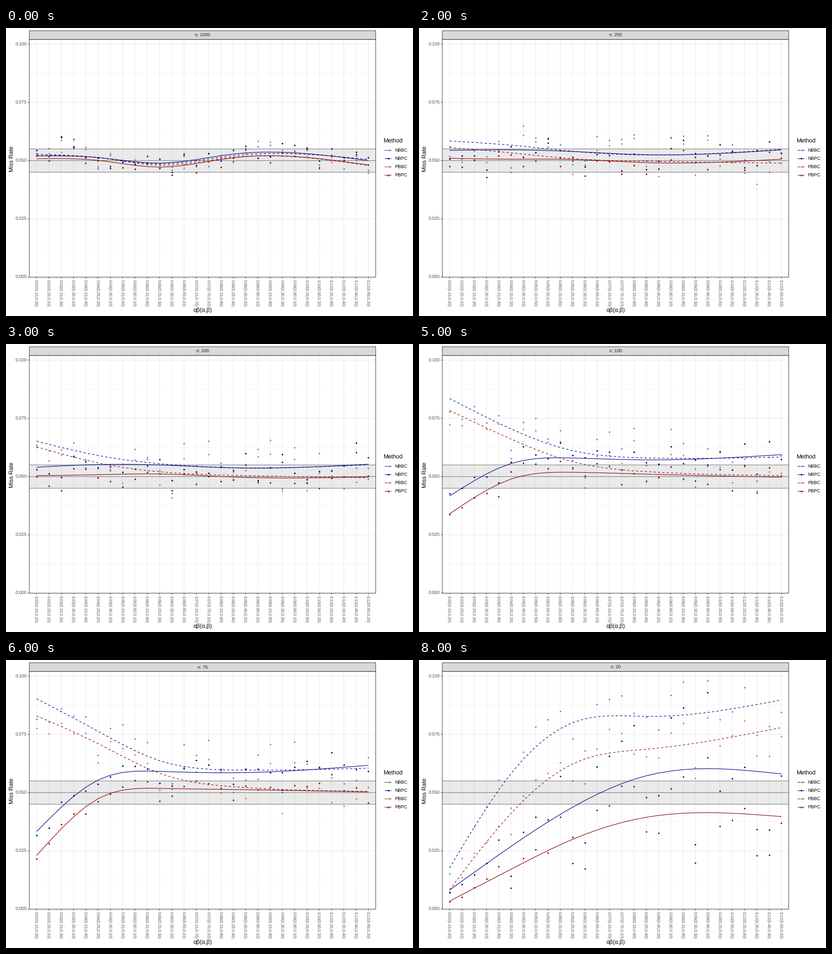
Recreate the animation shown at these times as a matplotlib script. Size 890 by 629 pixels, loop 9000 ms.

```python
import numpy as np
import matplotlib.pyplot as plt
from matplotlib.animation import FuncAnimation
from matplotlib.patches import Rectangle

W, H, DPI = 890, 629, 100
LEFT, RIGHT, TOP, BOTTOM = 51, 808.5, 25, 544.2
NAVY, MAROON = "#00008B", "#8B0000"
plt.rcParams.update({"font.family": "Liberation Sans", "path.snap": False,
                     "text.hinting": "none"})

STEPS = [1000, 500, 250, 200, 150, 100, 75, 50, 20]
STYLE = {  # colour, dot opacity, line style
    "NBBC": (NAVY, 0.5, (0, (4, 4))),
    "PBBC": (MAROON, 0.5, (0, (4, 4))),
    "PBPC": (MAROON, 1, "-"),
    "NBPC": (NAVY, 1, "-"),
}
PAIRS = sorted(((a, b) for a in range(1, 10) for b in range(1, 10) if 2 <= a * b <= 12),
               key=lambda p: (p[0] * p[1], p[0]))
INDEX = np.arange(1, len(PAIRS) + 1)
IMBALANCE = np.array([abs(np.log(a / b)) for a, b in PAIRS]) - 1.1
REPS = 5000  # simulated samples behind each dot

# Key points of the smooth curves in 0.0001, one row per sample size in SIZES
KNOTS = np.array([1, 6, 11, 17, 28])
SIZES = [20, 50, 75, 150, 250, 1000]
CURVES = {
    "NBBC": [[177, 582, 800, 827, 898], [684, 840, 758, 680, 625], [903, 763, 637, 597, 605],
             [739, 622, 575, 556, 554], [584, 566, 540, 524, 548], [527, 513, 486, 521, 505]],
    "NBPC": [[82, 269, 437, 572, 580], [163, 494, 619, 642, 595], [333, 554, 591, 585, 617],
             [535, 559, 564, 553, 562], [544, 546, 539, 525, 546], [520, 513, 489, 528, 500]],
    "PBBC": [[83, 411, 623, 686, 779], [557, 722, 653, 587, 521], [829, 710, 583, 525, 505],
             [720, 592, 537, 516, 503], [556, 533, 508, 497, 489], [521, 513, 480, 514, 479]],
    "PBPC": [[34, 171, 299, 394, 397], [100, 371, 505, 527, 486], [230, 474, 518, 513, 503],
             [496, 511, 519, 507, 489], [510, 506, 505, 491, 506], [508, 501, 472, 512, 481]],
}


def pt(px):
    return px * 72 / DPI


def px_x(i):
    return 67 + 26.87 * (np.asarray(i) - 1)


def px_y(rate):
    return 543.9 - 5087 * np.asarray(rate)


def spline(y):
    """Natural cubic spline through KNOTS, sampled at every category."""
    h, n = np.diff(KNOTS), len(KNOTS)
    slope = np.diff(y) / h
    A, r = np.eye(n), np.zeros(n)
    for i in range(1, n - 1):
        A[i, i - 1:i + 2] = h[i - 1], 2 * (h[i - 1] + h[i]), h[i]
        r[i] = 6 * (slope[i] - slope[i - 1])
    m = np.linalg.solve(A, r)
    k = np.clip(np.searchsorted(KNOTS, INDEX, side="right") - 1, 0, n - 2)
    t, hk = INDEX - KNOTS[k], h[k]
    b = slope[k] - hk * (2 * m[k] + m[k + 1]) / 6
    return y[k] + t * (b + t * (m[k] / 2 + t * (m[k + 1] - m[k]) / (6 * hk)))


def smooth(name, n):
    cols = np.transpose(CURVES[name]) / 1e4
    return spline(np.array([np.interp(np.log(n), np.log(SIZES), c) for c in cols]))


def simulate(n):
    """Curve and dots per method; related methods share most of their noise."""
    rng = np.random.default_rng(n)
    noise = {k: rng.normal(size=len(INDEX)) for k in ("all", "BC", "PC")}
    gain = {"BC": 0.13 * min(1, 250 / n), "PC": 0.45 * np.exp((20 - n) / 20)}
    out = {}
    for name in STYLE:
        kind, curve = name[2:], smooth(name, n)
        p = curve * (1 + gain[kind] * IMBALANCE)
        z = 0.6 * noise["all"] + 0.7 * noise[kind] + 0.4 * rng.normal(size=len(INDEX))
        p = p + z * np.sqrt(p * (1 - p) / REPS)
        out[name] = curve, np.round(p * REPS) / REPS
    return out


DATA = {n: simulate(n) for n in STEPS}

fig = plt.figure(figsize=(W / DPI, H / DPI), dpi=DPI, facecolor="white")
ax = fig.add_axes([0, 0, 1, 1])
ax.set(xlim=(0, W), ylim=(H, 0))
ax.axis("off")


def line(x, y, color, px, z=1, **kw):
    return ax.plot(x, y, color=color, lw=pt(px), zorder=z,
                   solid_capstyle="butt", dash_capstyle="butt", **kw)[0]


def dots(x, y, name, z):
    color, alpha, _ = STYLE[name]
    return ax.plot(x, y, "o", color=color, alpha=alpha, ms=pt(3.4), mew=0, zorder=z)[0]


def label(x, y, s, px, color="black", **kw):
    return ax.text(x, y, s, fontsize=pt(px), color=color, va="baseline",
                   rotation_mode="anchor", **kw)


def box(x0, y0, x1, y1, z, **kw):
    ax.add_patch(Rectangle((x0, y0), x1 - x0, y1 - y0, zorder=z, **kw))


# Grid, tolerance band and frame
for r in np.arange(0.0125, 0.1, 0.025):
    line([LEFT, RIGHT], [px_y(r)] * 2, "#EBEBEB", 0.6)
for r in np.arange(5) * 0.025:
    line([LEFT, RIGHT], [px_y(r)] * 2, "#EBEBEB", 1.2)
    line([LEFT - 3, LEFT], [px_y(r)] * 2, "#333333", 1.2)
    label(46, px_y(r) + 3.5, f"{r:.3f}", 10, "#4D4D4D", ha="right")
for x, (a, b) in zip(px_x(INDEX), PAIRS):
    line([x, x], [TOP, BOTTOM], "#EBEBEB", 1.2)
    line([x, x], [BOTTOM, BOTTOM + 3], "#333333", 1.2)
    label(x - 4, 550, f"{a * b / 100:.2f}({a / 10:.2f},{b / 10:.2f})", 8.6,
          "#4D4D4D", ha="left", rotation=270)
box(LEFT, px_y(0.055), RIGHT, px_y(0.045), 2, fc="#999999", alpha=0.2, lw=0)
for r in (0.045, 0.05, 0.055):
    line([LEFT, RIGHT], [px_y(r)] * 2, "#7F7F7F", 1.2, 3)
box(LEFT, TOP, RIGHT, BOTTOM, 8, fill=False, ec="#333333", lw=pt(1))
box(LEFT, 5.9, RIGHT, TOP, 8, fc="#D9D9D9", ec="#333333", lw=pt(1))

label(429.7, 620.5, "αβ(α,β)", 12.6, ha="center")
label(15.5, 285.7, "Miss Rate", 12.6, ha="center", rotation=90)
strip = label(429.7, 19.2, "", 10, "#1A1A1A", ha="center", zorder=9)

# Legend
label(826, 250, "Method", 12.6)
for i, name in enumerate(sorted(STYLE)):
    y = 267.2 + 18.1 * i
    line([828.3, 842.7], [y, y], STYLE[name][0], 1.2, 5, ls=STYLE[name][2])
    dots([835.5], [y], name, 4)
    label(850.5, y + 3.6, name, 10)

X = px_x(INDEX)
curves = {k: line(X, X, c, 1.2, 5, ls=ls) for k, (c, _, ls) in STYLE.items()}
points = {k: dots(X, X, k, 4) for k in STYLE}


def update(i):
    n = STEPS[i]
    strip.set_text(f"n: {n}")
    for name, (curve, rates) in DATA[n].items():
        curves[name].set_ydata(px_y(curve))
        points[name].set_ydata(px_y(rates))
    return [strip, *curves.values(), *points.values()]


anim = FuncAnimation(fig, update, frames=len(STEPS), interval=1000,
                     repeat=True, repeat_delay=0, blit=False)
plt.show()
```
